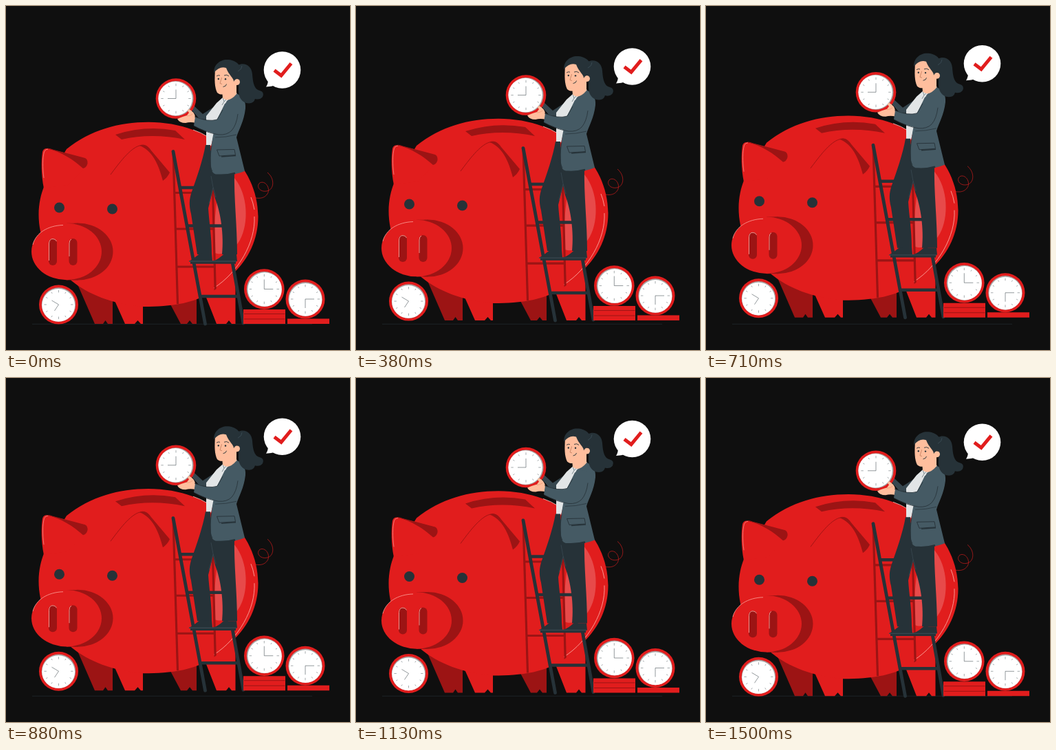
Animation, 500 px wide and 500 px high, one loop 1.54 s. Source, as an HTML page with a canvas:

```html
<!DOCTYPE html>
<html lang="en">
<head>
<meta charset="utf-8">
<title>Saving time</title>
<style>
html, body { margin: 0; width: 100%; height: 100%; overflow: hidden; background: #0f0f0f; }
canvas { display: block; width: 100vw; height: 100vh; }
</style>
</head>
<body>
<canvas id="stage"></canvas>
<script>
const LOOP = 1540, RISE = 10, LOWEST = 1510;
const BG = '#0f0f0f', RED = '#e11d1d', DEEP = '#9c1414', INK = '#263238',
      SUIT = '#455a64', SHADE = '#37474f', SKIN = '#ffbe9d', WHITE = '#fff';
const canvas = document.getElementById('stage');
const ctx = canvas.getContext('2d');

function fill(d, color) {
  ctx.fillStyle = color;
  ctx.fill(new Path2D(d));
}

function line(d, color, width = 1) {
  ctx.strokeStyle = color;
  ctx.lineWidth = width;
  ctx.stroke(new Path2D(d));
}

function oval(x, y, rx, ry, color) {
  ctx.fillStyle = color;
  ctx.beginPath();
  ctx.ellipse(x, y, rx, ry, 0, 0, Math.PI * 2);
  ctx.fill();
}

function disc(x, y, r, color) {
  oval(x, y, r, r, color);
}

// Hands are offsets from the centre; dx, dy push the face off its inner shadow.
function clock(x, y, r, hands, dx, dy) {
  disc(x, y, r, RED);
  disc(x, y, r - 3.8, '#a6a6a6');
  disc(x + dx, y + dy, r - 4.6, WHITE);
  for (let i = 0; i < 12; i++) {
    const a = i * Math.PI / 6, c = Math.cos(a), s = Math.sin(a);
    const outer = r * 0.74, inner = outer - (i % 3 ? 2.5 : 3.5);
    line(`M${x + c * inner} ${y + s * inner}L${x + c * outer} ${y + s * outer}`, '#6b7478', 0.6);
  }
  for (const [hx, hy] of hands) line(`M${x} ${y}l${hx} ${hy}`, INK, 0.5);
}

const BODY = 'M47.500 303C47.500 287 51 273 55 263L88 208C123 180 164 168.700 207 168.700C300 168.700 366.500 232 366.500 306' +
  'C366.500 340 352 368 331 388C310 412 288 425 258 432C238 436 220 437 200 437C155 434 118 418 96 400C60 370 47.500 335 47.500 303Z';

function pig() {
  line('M380 242C391 251 390 267 379 269C369 271 363 262 369 257C377 253 385 265 380 273C376 279 370 280 363 279', '#b81c1c', 0.8);
  fill('M102 400L129 462H141L144.500 457L148 462H155V424Z', DEEP);
  fill('M237 430L254 462H263L267 457L271 462H277V424Z', DEEP);
  fill('M288 416L306 462H320L324 457L328 462H333.500V384Z', RED);
  fill('M156 424L173 462H187L191.500 457L196 462H199V434Z', RED);
  fill(BODY, RED);

  fill('M55 265C51 245 51 225 53 212Q55 205 64 208L115 221Q119 223 118 230L113 237L90 260Z', RED);
  fill('M59 207Q63 206 68 208.500L115 221Q119 223 118.500 229Q117 235 112 236C98 224 82 212 59 207Z', DEEP);
  line('M55 250C53 235 53 221 55.500 212Q57 208 61 208', '#ffb5ad', 0.6);

  line('M152 245C164 229 180 207 194 203Q201 200 207 206', DEEP, 0.9);
  fill('M194 203C202 200 207 204 211 210L238 242Q235 249 228 254C222 230 212 209 194 203Z', DEEP);
  fill('M159 187Q202 173 246 181L260 194Q212 184 168 194Z', DEEP);
  line('M272 180Q284 184 293 190', '#ffc5bf', 0.8);

  fill('M332 250C352 274 353 316 340 340C330 358 313 363 304 359C300 348 303 300 310 262Z', 'rgba(255,255,255,.2)');
  line('M356 278Q359 285 361 296M361 306C363 343 338 387 302 410', '#ffb5ad', 0.8);

  disc(77.5, 293, 7.5, INK);
  disc(154.5, 295, 7.5, INK);

  oval(104.5, 357, 51, 41.5, DEEP);
  fill('M88 315.800H105V317H88ZM88 398.500H105V397H88Z', DEEP);
  oval(88, 357, 51, 41.2, RED);
  line('M39 347C43 330 61 319 83 318.500', '#ffb5ad', 0.7);
  for (const x of [62, 91.5]) {
    ctx.fillStyle = DEEP;
    ctx.beginPath();
    ctx.roundRect(x, 338, 12, 39, 6);
    ctx.fill();
  }
  line('M62.500 370V345Q63 338.500 68 338.500Q72 338.500 73.500 342M92 364V345Q92 340 95 339', '#ffb5ad', 0.8);
}

function ladder() {
  ctx.save();
  ctx.clip(new Path2D(BODY));
  line('M243 212L249.500 433M299 205L304.500 425M245 271.500H301M247 324H303M248 379H304', DEEP, 3.2);
  ctx.restore();
  line('M251 264H300M264 319.500H314M281 422H336', INK, 4.5);
  ctx.lineCap = 'round';
  line('M243 211.500L289.500 462', INK, 4.8);
  line('M329 372L345 461', INK, 4.8);
  ctx.lineCap = 'butt';
  line('M268 372.500H334', INK, 4.5);
}

function head() {
  fill('M337 86C347 81 357 87 358 99C359 113 361 121 369 123Q376 125 373 132Q369 137 362 135Q360 143 349 141C341 138 337 131 338 118Z', INK);
  fill('M314 122L315 134Q324 141 335 128L335 107Z', SKIN);
  fill('M304 92C303 108 303 118 307 126C312 131 325 129 333 117L337 96L322 83Z', SKIN);
  disc(335.5, 110.5, 4.5, SKIN);
  fill('M302.500 97C301 86 311 78 321 78C334 78 343 86 342 98Q341 107 336 106Q333 106 331 110C331 104 324 101 320 90Q310 87 302.500 97Z', INK);
  line('M337 95Q343 92 343 87', SUIT, 0.6);
  disc(308.8, 106, 1.2, INK);
  disc(319, 106.3, 1.2, INK);
  line('M306 102Q308 100 311 101M317 101Q321 99 324 102', INK, 0.9);
  line('M313.500 104L311 112.500L314 113.500', '#b87354', 0.7);
  line('M315.500 117.500Q320 117 320.500 113.500', INK, 0.9);
}

function woman() {
  fill('M290 202C286 225 277 250 270 270C266 281 266 290 269 302L278 361H299C299 335 295 312 294 294L302 262L315 230Z', INK);
  fill('M297 238H332C331 280 336 318 336 361H314C317 333 312 300 304 280L298 252Z', INK);
  line('M301 264L295 287M298 247Q300 262 305 278', '#3d4d55', 0.7);
  fill('M266 371Q273 367 279 362Q283 358 288 360H299L300 371Z', INK);
  fill('M301 371Q310 367 315 362Q319 358 323 361H335L336 371Z', INK);
  line('M266 371H335', SHADE, 1.3);

  fill('M268 149L273 145L286 157L303 146L300 166L281 164Z', SHADE);
  fill('M315 133L335 126L338 132L322 152L302 188L298 203H291V160L306 141Z', '#e2e5e6');
  fill('M335 127C344 131 349 138 348 149C346 168 338 180 335 191L347 240C335 245 315 248 301 245Q296 240 297 220C298 201 302 181 306 166L321 138Z', SUIT);
  fill('M290 202H297L298 238Q291 225 290 202Z', INK);
  line('M297 236Q298 244 304 245.500Q320 247 333 243', INK, 2.6);
  line('M299 203C296 221 296 234 300 240', INK, 0.8);
  line('M304 191Q320 191 335 187', INK, 0.7);
  line('M306.500 209L332 208.500L333.500 216.500L310 218Z', INK, 0.9);
  line('M313 219L334 217.500', INK, 1.6);
  line('M315 133L317 139L324 132M317 139L314 144', '#68767c', 0.8);
  head();
}

function nearArm() {
  fill('M249 164Q256 161 263 159L266 155Q262 151 266 150Q274 154 275 161L276 170Q268 168 261 170Q252 170 249 164Z', SKIN);
  line('M263 160Q268 160 271 157', '#eb996e', 0.7);
  fill('M275 161Q295 169 307 165L318 142Q335 134 343 146C340 163 334 175 328 181Q319 188 309 187Q290 183 273 174Z', SUIT);
  line('M274 161Q294 169 307 165L315 151M273 174Q290 184 309 187Q321 188 328 181Q335 173 337 157', INK, 0.8);
}

function bubble() {
  disc(401.5, 93, 26.8, WHITE);
  fill('M381 107Q381 113 378 117.500Q386 117 392 115Z', WHITE);
  line('M390 93.500L400 101L414.500 83.500', RED, 5);
}

function scene() {
  pig();
  ladder();
  woman();
  clock(247, 134.5, 29.3, [[0, -13], [-12, 0]], -0.9, 0);
  nearArm();
  fill('M345 441H406V462H345Z', RED);
  line('M346 447.500H405.500M346 455H405.500', DEEP, 1);
  fill('M409 454.500H470V462H409Z', RED);
  clock(375.3, 411.5, 29.3, [[0, -14], [13, 0]], 0.8, 0.5);
  clock(435, 426, 28.5, [[13, 0], [0, 13]], 0.3, 0.9);
  clock(76.5, 434, 28.5, [[-10, -6], [-6, 9]], -0.3, 0.9);
  bubble();
}

function resize() {
  const ratio = window.devicePixelRatio || 1;
  canvas.width = Math.round(innerWidth * ratio);
  canvas.height = Math.round(innerHeight * ratio);
}

// Constant speed up and down, with hard turns at both ends.
function lift(time) {
  const phase = ((time - LOWEST + LOOP) % LOOP + LOOP) % LOOP / LOOP;
  return RISE * (1 - Math.abs(2 * phase - 1));
}

function frame() {
  ctx.setTransform(canvas.width / 500, 0, 0, canvas.height / 500, 0, 0);
  ctx.fillStyle = BG;
  ctx.fillRect(0, 0, 500, 500);
  line('M38 462.300H445', INK, 0.6);
  ctx.translate(0, 0.4 - lift(performance.now() - start));
  scene();
  requestAnimationFrame(frame);
}

addEventListener('resize', resize);
resize();
const start = performance.now();
frame();
</script>
</body>
</html>
```
